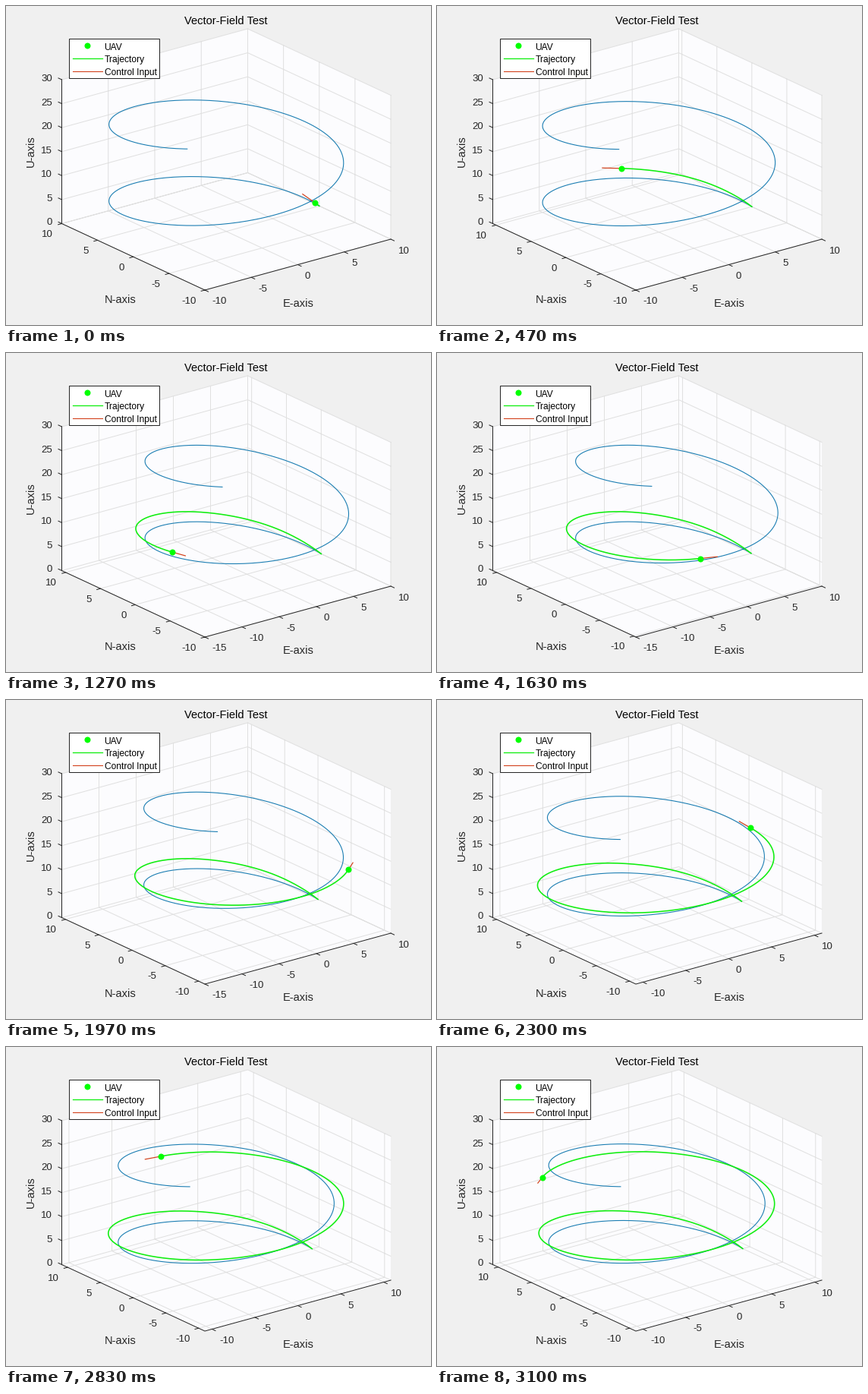
A matplotlib script for the animation above (3130 ms loop, 560 by 420 pixels).

```python
import numpy as np
import matplotlib
import matplotlib.pyplot as plt
from matplotlib.animation import FuncAnimation
from matplotlib.patches import Polygon, Rectangle

W, H, DPI = 560, 420, 100
FRAMES, LOOP = 94, 3130
PX = 72 / DPI

matplotlib.rcParams["font.family"] = "Liberation Sans"
BACK, WALL, INK = "#f0f0f0", "#fcfcfe", "#262626"
GRID = "#e0e0e0"
BLUE, GREEN, RED = "#1a7db2", "#10ee10", "#d2401a"

# Corners of the axes box on screen
FRONT = np.array([262.0, 374.0])
E_EDGE = np.array([245.0, -67.0])
N_EDGE = np.array([-188.5, -87.5])
U_EDGE = np.array([0.0, -189.5])
U_MAX = 30


def smooth(x, xs, ys):
    """Cubic Hermite curve through a few knots."""
    xs, ys = np.array(xs, float), np.array(ys, float)
    m = np.gradient(ys, xs)
    i = np.clip(np.searchsorted(xs, x) - 1, 0, len(xs) - 2)
    h = xs[i + 1] - xs[i]
    t = (x - xs[i]) / h
    return ((2 * t**3 - 3 * t**2 + 1) * ys[i] + (t**3 - 2 * t**2 + t) * h * m[i]
            + (3 * t**2 - 2 * t**3) * ys[i + 1] + (t**3 - t**2) * h * m[i + 1])


def angle(frame):
    return smooth(frame, [0, 14, 38, 59, 69, 79, 93],
                  [0.06, 1.243, 3.22, 5.28, 6.257, 7.231, 8.542])


def flight(a):
    """Position of the vehicle at turning angle a."""
    r = smooth(a, [0, 0.3, 0.7, 1.57, 2.39, 3.2, 4.7, 5.6, 6.28, 7.85, 8.6],
               [10, 10.02, 10.15, 10.55, 10.9, 10.83, 10.95, 10.88, 10.82, 10.8, 10.88])
    u = smooth(a, [0, 0.553, 1.243, 2.389, 3.22, 3.857, 5.28, 6.257, 7.231, 8.6],
               [0, 2.5, 4.85, 7.95, 9.75, 11.1, 13.85, 15.1, 16.4, 17.85])
    return np.array([r * np.cos(a), r * np.sin(a), u])


def project(p, e_lim, n_lim):
    e, n, u = np.broadcast_arrays(*p)
    fe = (e - e_lim[0]) / (e_lim[1] - e_lim[0])
    fn = (n - n_lim[0]) / (n_lim[1] - n_lim[0])
    return (FRONT[:, None] + np.outer(E_EDGE, fe) + np.outer(N_EDGE, fn)
            + np.outer(U_EDGE, u / U_MAX))


def limits(track, tip):
    pts = np.column_stack([track, tip])
    lo = np.minimum(pts.min(axis=1), -10)
    hi = np.maximum(pts.max(axis=1), 10)
    e_lo = -15 if lo[0] < -10.01 and hi[0] < 10.02 else lo[0]
    return (e_lo, hi[0]), (lo[1], hi[1])


def join(segments):
    """Chain point lists into one line with gaps."""
    gap = np.full((1, 2), np.nan)
    return np.vstack([np.vstack([s, gap]) for s in segments]).T


fig = plt.figure(figsize=(W / DPI, H / DPI), dpi=DPI, facecolor=BACK)
ax = fig.add_axes([0, 0, 1, 1])
ax.set_xlim(0, W)
ax.set_ylim(H, 0)
ax.axis("off")


def line(color, width, **kw):
    return ax.plot([], [], color=color, lw=width * PX, **kw)[0]


def label(x, y, s, size, **kw):
    kw = {"ha": "center", "va": "center_baseline", "color": INK, **kw}
    return ax.text(x, y, s, fontsize=size * PX, **kw)


LEFT, RIGHT = FRONT + N_EDGE, FRONT + E_EDGE
REAR = LEFT + E_EDGE
ax.add_patch(Polygon([FRONT, LEFT, LEFT + U_EDGE, REAR + U_EDGE, RIGHT + U_EDGE, RIGHT],
                     fc=WALL, ec="none"))

grid = line(GRID, 1)
helix, trail = line(BLUE, 1.1), line(GREEN, 1.6)
command = line(RED, 1.2)
drone = line("#00ff00", 0, marker="o", ms=8 * PX, mew=0)
edges, ticks = line(INK, 1), line(INK, 1)
edges.set_data(*np.array([LEFT + U_EDGE, LEFT, FRONT, RIGHT]).T)

label(289.5, 18.5, "Vector-Field Test", 14.67, color="black")
label(385, 390.5, "E-axis", 14.67)
label(150.5, 385.5, "N-axis", 14.67)
label(33, 191, "U-axis", 14.67, rotation=90, va="center")
for k in range(7):
    label(61, (LEFT + U_EDGE * k / 6)[1] - 2.5, str(5 * k), 13.3, ha="right")
e_text = [label(0, 0, "", 13.3, ha="left") for _ in range(6)]
n_text = [label(0, 0, "", 13.3, ha="right") for _ in range(6)]

# Legend
ax.add_patch(Rectangle((83, 42.5), 119, 52, fc="white", ec=INK, lw=PX, zorder=5))
ax.plot([107], [52], "o", color="#00ff00", ms=8 * PX, mew=0, zorder=6)
ax.plot([88, 127], [69, 69], color=GREEN, lw=1.3 * PX, zorder=6)
ax.plot([88, 127], [85.5, 85.5], color=RED, lw=1.1 * PX, zorder=6)
for y, s in ((53, "UAV"), (69.5, "Trajectory"), (86, "Control Input")):
    label(129.5, y, s, 12, ha="left", color="black", zorder=6)

turn = np.linspace(0, 10, 400)
SPIRAL = np.array([10 * np.cos(turn), 10 * np.sin(turn), 2.54 * turn])


def fives(lim):
    return np.arange(np.ceil(lim[0] / 5 - 1e-6), np.floor(lim[1] / 5 + 1e-6) + 1) * 5


def place(texts, values, spots, offset):
    for i, t in enumerate(texts):
        shown = i < len(values)
        t.set_visible(shown)
        if shown:
            t.set_text(f"{values[i]:.0f}")
            t.set_position(spots[i] + offset)


def update(frame):
    a = angle(frame)
    track = flight(np.linspace(0, a, 260))
    here = track[:, -1]
    step = flight(a + 0.005) - flight(a - 0.005)
    tip = here + 1.75 * step / np.linalg.norm(step)
    e_lim, n_lim = limits(track, tip)

    helix.set_data(*project(SPIRAL, e_lim, n_lim))
    trail.set_data(*project(track, e_lim, n_lim))
    shaft = project(np.column_stack([here, tip]), e_lim, n_lim)
    command.set_data(*shaft)
    drone.set_data(shaft[0, :1], shaft[1, :1])

    e_val, n_val = fives(e_lim), fives(n_lim)
    e_pos = project((e_val, n_lim[0], 0.0), e_lim, n_lim).T
    n_pos = project((e_lim[0], n_val, 0.0), e_lim, n_lim).T
    u_pos = [LEFT + U_EDGE * k / 6 for k in range(7)]
    grid.set_data(*join(
        [[p, p + N_EDGE, p + N_EDGE + U_EDGE] for p in e_pos]
        + [[p, p + E_EDGE, p + E_EDGE + U_EDGE] for p in n_pos]
        + [[p, p + E_EDGE, p + E_EDGE - N_EDGE] for p in u_pos]))
    ticks.set_data(*join([[p, p + (4.5, 2.1)] for p in e_pos]
                         + [[p, p + (-4.8, 1.3)] for p in n_pos]
                         + [[p, p + (-4.5, -2.1)] for p in u_pos]))
    place(e_text, e_val, e_pos, np.array([9.5, 14]))
    place(n_text, n_val, n_pos, np.array([-11.5, 13]))
    return []


anim = FuncAnimation(fig, update, frames=FRAMES, interval=LOOP / FRAMES,
                     repeat=True, repeat_delay=0, blit=False)
plt.show()
```
